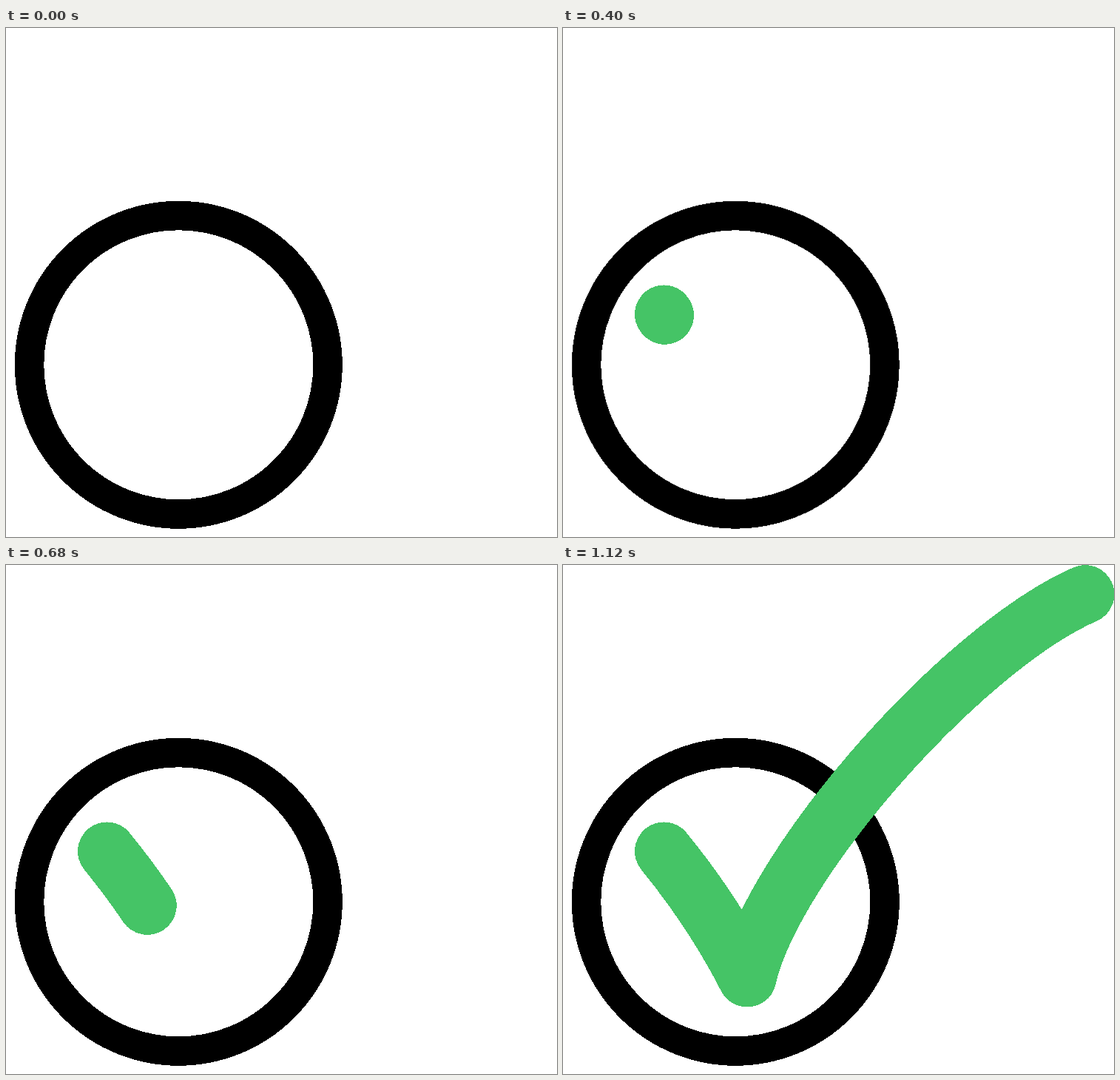
Recreate the animation shown at these times as an HTML page. Size 745 px wide and 688 px high, loop 3.6 s.

```html
<!DOCTYPE html>
<html lang="en">
<head>
<meta charset="utf-8">
<title>Check mark</title>
<style>
  html, body {
    margin: 0;
    width: 100%;
    height: 100%;
    overflow: hidden;
    background: #fff;
  }
  svg {
    display: block;
    width: 745px;
    height: 688px;
    fill: none;
    shape-rendering: crispEdges;
  }
  .ring {
    stroke: #000;
    stroke-width: 39.5px;
    transform-origin: 233.3px 455.3px;
    animation: pulse 3600ms infinite;
  }
  .tick {
    stroke: #45c466;
    stroke-width: 79px;
    stroke-linecap: round;
    stroke-linejoin: round;
    stroke-dasharray: 1 2;
    animation: draw 3600ms linear infinite, show 3600ms step-end infinite;
  }
  /* swell, dip, settle */
  @keyframes pulse {
    0% { transform: scale(1); animation-timing-function: ease-in-out; }
    7.7778% { transform: scale(1.05); animation-timing-function: ease-in-out; }
    13.6111% { transform: scale(.97); animation-timing-function: ease-in-out; }
    18.8889%, 100% { transform: scale(1); }
  }
  @keyframes draw {
    0% { stroke-dashoffset: 1; }
    9.6667% { stroke-dashoffset: 1; animation-timing-function: cubic-bezier(.966, 0, .607, 1); }
    31.1111%, 100% { stroke-dashoffset: 0; }
  }
  @keyframes show {
    0% { visibility: hidden; }
    9.8%, 100% { visibility: visible; }
  }
</style>
</head>
<body>
<svg viewBox="0 0 745 688">
  <circle class="ring" cx="233.3" cy="455.3" r="201.75"/>
  <path class="tick" pathLength="1"
    d="M136.5 387Q203.5 469 249 558C285 401 541 111.5 706 39.5"/>
</svg>
</body>
</html>
```
